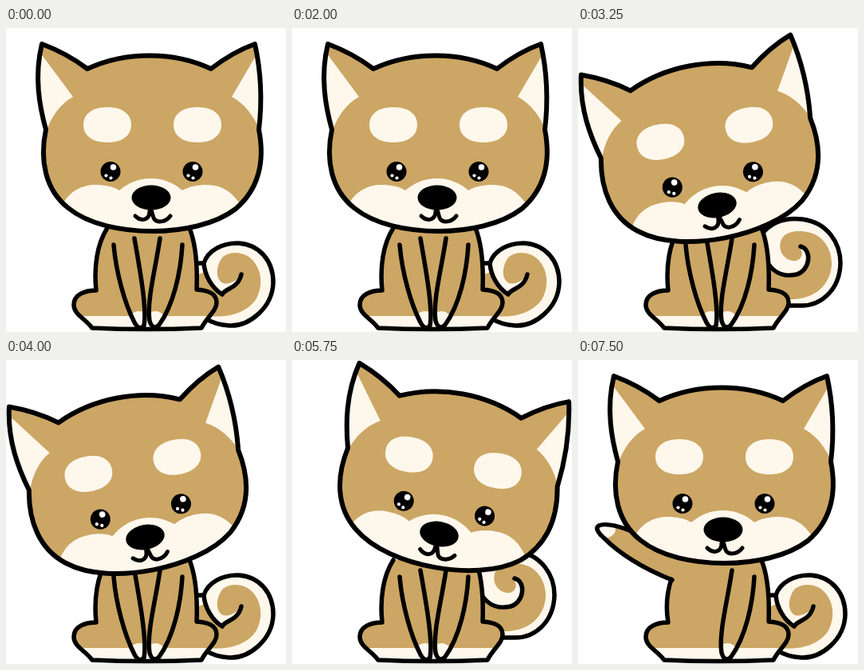
These frames come from a looping animation (351 px wide and 380 px high, 7.75 s). An HTML page with a canvas:

```html
<!DOCTYPE html>
<html lang="en">
<head>
<meta charset="utf-8">
<title>Puppy</title>
<style>
html, body { margin: 0; width: 100%; height: 100%; overflow: hidden; background: #fff; }
canvas { display: block; width: 351px; height: 380px; }
</style>
</head>
<body>
<canvas id="stage" width="351" height="380"></canvas>
<script>
const ctx = document.getElementById('stage').getContext('2d');
const TAN = '#cca664', CREAM = '#fef7ec', INK = '#000';
const STEP = 250, STEPS = 31;

const tails = [
  {
    shape: 'M242 294H248C253 278 272 268 292 269C318 271 335 291 335 318C334 350 305 373 280 372C265 371 256 367 250 363H236Z',
    tan: 'M236 310L249 305C252 318 260 327 271 333C275 325 291 326 295 308C290 316 280 321 272 319C261 313 264 295 272 286C282 278 299 280 308 289C320 301 323 320 314 338C303 355 281 363 252 360L236 360Z',
    line: 'M242 294H248C253 278 272 268 292 269C318 271 335 291 335 318C334 350 305 373 280 372C265 371 256 367 250 363M248 294C249 309 258 325 271 333C275 325 291 326 295 308'
  },
  {
    shape: 'M230 258C245 239 264 237 281 239C313 243 329 269 329 294C328 328 304 348 278 347L230 347Z',
    tan: 'M230 296L240 297C250 310 264 311 275 308C290 303 291 278 277 273C285 283 279 292 269 291C253 288 249 270 258 260C267 252 289 252 302 261C317 272 321 293 316 307C310 326 294 337 272 339L230 339Z',
    line: 'M230 258C245 239 264 237 281 239C313 243 329 269 329 294C328 328 304 348 278 347L255 347M238 294C247 308 261 311 274 308C291 303 294 277 279 273'
  }
];

const leftSide = 'M127 250C114 270 110 299 113 328';
const lowerBody = 'C99 328 85 333 85 346C85 358 99 363 108 375Q175 378 245 375C252 361 264 354 264 343C264 331 252 328 239 327C240 300 238 270 230 250';
const bodyShape = leftSide + lowerBody + 'Z';
const bodyLine = leftSide + lowerBody;
const wavingLine = 'M117 274C111 292 110 310 113 328' + lowerBody;
const armShape = 'M140 240L62 212C48 207 33 204 26 207C21 210 26 217 32 222C52 242 83 261 118 275L150 275Z';
const armLine = 'M120 236L62 212C48 207 33 204 26 207C21 210 26 217 32 222C52 242 83 261 118 275';
const leftLeg = 'M135 271C138 306 149 345 161 368Q167 379 173 372C177 350 167 298 161 263';
const rightLeg = 'M193 263C188 298 176 342 180 366Q184 379 192 371C210 346 219 306 221 271';

const headShape = 'M45 20Q77 32 102 51C150 29 210 29 257 51Q284 30 312 20C318 47 322 85 317 127C325 168 317 201 288 226C262 246 220 254 184 254C145 254 104 246 78 225C49 202 42 165 50 127C42 98 35 61 45 20Z';
const earPatches = 'M46 35L84 86Q61 99 50 130L30 130V35ZM313 35L283 86Q306 98 319 130L340 130V35Z';
const muzzle = 'M70 222C80 203 96 196 112 196C124 196 134 198 142 203C154 193 167 188 182 188C197 188 211 194 221 203C230 198 240 196 251 196C270 196 283 204 294 221V265H70Z';
const mouth = 'M162 235C169 242 180 241 180 229M182 227C185 236 184 241 192 242C198 242 203 239 206 235';

function fill(path, color) {
  ctx.fillStyle = color;
  ctx.fill(new Path2D(path));
}

function stroke(path, width = 5.5) {
  ctx.lineWidth = width;
  ctx.strokeStyle = INK;
  ctx.stroke(new Path2D(path));
}

function oval(x, y, rx, ry = rx, color = INK) {
  ctx.fillStyle = color;
  ctx.beginPath();
  ctx.ellipse(x, y, rx, ry, 0, 0, Math.PI * 2);
  ctx.fill();
}

function clipped(path, draw) {
  ctx.save();
  ctx.clip(new Path2D(path));
  draw();
  ctx.restore();
}

function drawTail({ shape, tan, line }) {
  fill(shape, CREAM);
  clipped(shape, () => fill(tan, TAN));
  stroke(line);
}

function drawLeg(path, pawX) {
  fill(path, TAN);
  clipped(path, () => oval(pawX, 371, 15, 17, CREAM));
  stroke(path);
}

function drawBody(waving) {
  fill(bodyShape, TAN);
  clipped(bodyShape, () => {
    ctx.fillStyle = CREAM;
    ctx.fillRect(80, 360, 190, 20);
  });
  if (waving) {
    fill(armShape, TAN);
    clipped(armShape, () => oval(31, 212, 16, 11, CREAM));
    stroke(armLine);
  } else {
    drawLeg(leftLeg, 167);
  }
  drawLeg(rightLeg, 187);
  stroke(waving ? wavingLine : bodyLine);
}

function drawBrow(x) {
  const y = 121, w = 30, h = 22, k = .62;
  ctx.fillStyle = CREAM;
  ctx.beginPath();
  ctx.moveTo(x - w, y);
  for (const s of [-1, 1]) {
    ctx.bezierCurveTo(x + s * w, y + s * h * k, x + s * w * k, y + s * h, x, y + s * h);
    ctx.bezierCurveTo(x - s * w * k, y + s * h, x - s * w, y + s * h * k, x - s * w, y);
  }
  ctx.fill();
}

function drawEye(x, squinting) {
  ctx.save();
  ctx.translate(x, squinting ? 186 : 179.5);
  if (squinting) ctx.scale(1, .5);
  oval(0, 0, 12.5);
  oval(3.5, -5.5, 3.8, 3.8, '#fff');
  oval(-5.5, 5, 2.1, 2.1, '#fff');
  oval(.5, 8, 2.1, 2.1, '#fff');
  ctx.restore();
}

function drawHead({ x, y, angle }, squinting) {
  ctx.save();
  ctx.translate(x, y);
  ctx.rotate(angle * Math.PI / 180);
  ctx.translate(-182, -212);
  fill(headShape, TAN);
  clipped(headShape, () => {
    fill(earPatches, CREAM);
    fill(muzzle, CREAM);
  });
  stroke(headShape, 6);
  drawBrow(127);
  drawBrow(240);
  drawEye(131, squinting);
  drawEye(234, squinting);
  oval(182, 212, 24.5, 15.5);
  stroke(mouth, 5);
  ctx.restore();
}

const poses = {
  straight: { x: 182, y: 212, angle: 0 },
  left: { x: 174.5, y: 221.5, angle: -10.8 },
  right: { x: 184.5, y: 217.5, angle: 10.4 }
};

const within = (n, from, to) => n >= from && n <= to;

function poseAt(step) {
  if (within(step, 9, 17)) return poses.left;
  if (within(step, 22, 24)) return poses.right;
  return poses.straight;
}

function draw(step) {
  ctx.fillStyle = '#fff';
  ctx.fillRect(0, 0, 351, 380);
  ctx.lineCap = ctx.lineJoin = 'round';
  drawTail(tails[step % 2]);
  drawBody(within(step, 27, 30));
  drawHead(poseAt(step), step === 5);
}

const start = performance.now();

function tick() {
  draw(Math.floor((performance.now() - start) / STEP) % STEPS);
  requestAnimationFrame(tick);
}
tick();
</script>
</body>
</html>
```
